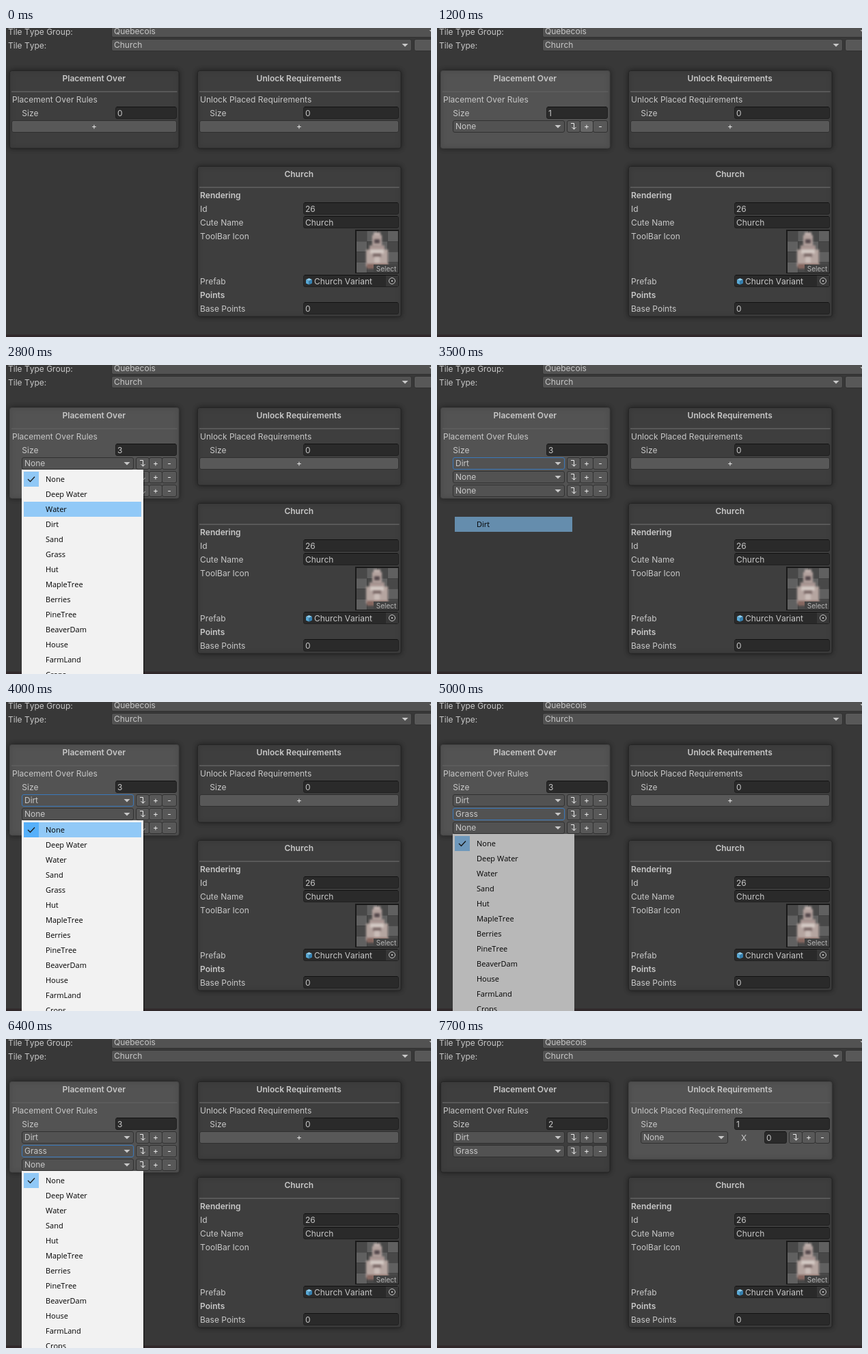
Recreate the animation shown at these times as an HTML page with a canvas. Size 622 by 452 pixels, loop 8 s.

```html
<!DOCTYPE html>
<html lang="en">
<head>
<meta charset="utf-8">
<title>Tile rule editor</title>
<style>
html, body { margin: 0; width: 100%; height: 100%; overflow: hidden; background: #383838; }
canvas { display: block; }
</style>
</head>
<body>
<canvas id="stage" width="622" height="452"></canvas>
<script>
const ctx = document.getElementById('stage').getContext('2d');
const LOOP = 8000;
const TILES = ['None', 'Deep Water', 'Water', 'Dirt', 'Sand', 'Grass', 'Hut', 'MapleTree', 'Berries',
  'PineTree', 'BeaverDam', 'House', 'FarmLand', 'Crops'];

// Each step overrides part of the state from its time on.
// hot: [button, row], menu: row of the open list, item: tile under the pointer,
// light: brightness of the list, closing: only the chosen item is left.
const STEPS = [
  [0, { rules: [], needs: 0, bottom: 176.5, active: '', hot: [], pressed: false, focus: -1, menu: -1, light: 1, item: '', closing: false }],
  [400, { hot: ['addRule'] }],
  [600, { rules: ['None'], active: 'rules', hot: [] }],
  [1100, { hot: ['move', 0] }],
  [1200, { hot: ['+', 0] }],
  [1400, { pressed: true }],
  [1500, { rules: ['None', 'None'], hot: [], pressed: false }],
  [1600, { hot: ['+', 0] }],
  [1700, { hot: [] }],
  [1900, { hot: ['-', 0] }],
  [2000, { hot: [] }],
  [2100, { hot: ['+', 0] }],
  [2300, { pressed: true }],
  [2400, { rules: ['None', 'None', 'None'], bottom: 195.5, hot: [], pressed: false }],
  [2600, { menu: 0, light: .76, item: 'None' }],
  [2700, { light: 1 }],
  [2800, { item: 'Water' }],
  [3200, { item: 'Dirt' }],
  [3500, { rules: ['Dirt', 'None', 'None'], focus: 0, closing: true, light: .7 }],
  [3600, { light: .5 }],
  [3700, { light: .3 }],
  [3800, { closing: false, menu: -1 }],
  [3900, { menu: 1, light: .76, item: 'None' }],
  [4000, { light: 1 }],
  [4100, { item: 'Water' }],
  [4200, { item: 'Grass' }],
  [4500, { rules: ['Dirt', 'Grass', 'None'], focus: 1, closing: true, light: .7 }],
  [4600, { light: .5 }],
  [4700, { light: .3 }],
  [4800, { closing: false, menu: -1 }],
  [5000, { menu: 2, light: .76, item: '' }],
  [5100, { light: 1 }],
  [5200, { item: 'Water' }],
  [5300, { item: 'MapleTree' }],
  [5400, { item: 'BeaverDam' }],
  [5500, { item: 'Crops' }],
  [5700, { item: '' }],
  [6200, { item: 'House' }],
  [6300, { item: 'Hut' }],
  [6400, { item: '' }],
  [6700, { menu: -1, focus: -1 }],
  [7000, { hot: ['-', 2] }],
  [7100, { rules: ['Dirt', 'Grass'], hot: [] }],
  [7400, { hot: ['addNeed'] }],
  [7600, { active: 'needs', pressed: true }],
  [7700, { needs: 1, hot: [], pressed: false }],
];

const stateAt = t => Object.assign({}, ...STEPS.filter(s => s[0] <= t).map(s => s[1]));

function rect(x, y, w, h, fill) {
  ctx.fillStyle = fill;
  ctx.fillRect(x, y, w, h);
}

function box(x, y, w, h, fill, border, radius = 2.5) {
  ctx.beginPath();
  ctx.roundRect(x + .5, y + .5, w - 1, h - 1, radius);
  ctx.fillStyle = fill;
  ctx.fill();
  ctx.lineWidth = 1;
  ctx.strokeStyle = border;
  ctx.stroke();
}

function text(s, x, y, { font = '12px Inter, sans-serif', color = '#c8c8c8', align = 'left' } = {}) {
  ctx.font = font;
  ctx.fontKerning = 'none';
  ctx.fillStyle = color;
  ctx.textAlign = align;
  ctx.fillText(s, x, y);
}

const heading = (s, x, y, align) => text(s, x, y, { font: '600 12px Inter, sans-serif', align });

function line(points, color, width = 1) {
  ctx.beginPath();
  points.forEach(([x, y]) => ctx.lineTo(x, y));
  ctx.strokeStyle = color;
  ctx.lineWidth = width;
  ctx.stroke();
}

function polygon(points, fill) {
  ctx.beginPath();
  points.forEach(([x, y]) => ctx.lineTo(x, y));
  ctx.fillStyle = fill;
  ctx.fill();
}

function field(x, y, w, value) {
  box(x, y, w, 18, '#2a2a2a', '#202020');
  rect(x + 2, y, w - 4, 1, '#121212');
  text(value, x + 3, y + 14);
}

function dropdown(x, y, w, value, focused) {
  box(x, y, w, 18, '#525252', focused ? '#3a79bb' : '#303030');
  text(value, x + 4, y + 13);
  const ax = x + w - 10;
  polygon([[ax - 4.5, y + 7], [ax + 4.5, y + 7], [ax, y + 11.5]], '#c8c8c8');
}

function button(x, y, w, label, s, name, row) {
  const hot = s.hot[0] === name && s.hot[1] === row;
  box(x, y, w, 18, hot ? (s.pressed ? '#46607c' : '#676767') : '#585858', '#303030');
  if (label) text(label, x + w / 2, y + 13, { align: 'center', color: '#eee' });
}

function rowButtons(x, y, s, row) {
  button(x, y, 20, '', s, 'move', row);
  line([[x + 6, y + 4.5], [x + 10.5, y + 4.5], [x + 10.5, y + 13]], '#eee');
  line([[x + 7.5, y + 10], [x + 10.5, y + 13.2], [x + 13.5, y + 10]], '#eee');
  button(x + 19, y, 20, '+', s, '+', row);
  button(x + 38, y, 22, '-', s, '-', row);
}

function panel(x, y, w, bottom, title, active) {
  ctx.save();
  ctx.shadowColor = 'rgba(0,0,0,.45)';
  ctx.shadowBlur = 7;
  box(x, y, w, bottom - y, active ? '#535353' : '#3e3e3e', active ? '#444' : '#252525', 3);
  ctx.restore();
  heading(title, x + w / 2 - .5, y + 16, 'center');
  rect(x + 3, y + 30.5, w - 6, 1.2, active ? '#626262' : '#6b6b6b');
}

function rulesPanel(s) {
  panel(5, 62, 248.5, s.bottom, 'Placement Over', s.active === 'rules');
  text('Placement Over Rules', 9, 109);
  text('Size', 23.3, 129);
  field(160, 115, 90, s.rules.length);
  if (!s.rules.length) button(8, 135, 242, '+', s, 'addRule');
  s.rules.forEach((rule, i) => {
    const y = 135 + i * 20;
    dropdown(23, y, 164, rule, s.focus === i);
    rowButtons(190, y, s, i);
  });
}

function needsPanel(s) {
  panel(280, 62, 298.5, 176.5, 'Unlock Requirements', s.active === 'needs');
  text('Unlock Placed Requirements', 284, 109);
  text('Size', 298.3, 129);
  field(435, 115, 140, s.needs);
  if (!s.needs) return button(283, 135, 292, '+', s, 'addNeed');
  dropdown(298, 135, 128, 'None');
  text('X', 445, 149);
  field(479, 135, 33, '0');
  rowButtons(515, 135, s, 9);
}

function thumbnail(x, y) {
  rect(x, y, 64, 64, '#191919');
  for (let i = 0; i < 16; i++) {
    const col = i % 4, row = i >> 2;
    rect(x + 2 + col * 15.2, y + 2 + row * 15.2, 15.2, 15.2, (col + row) % 2 ? '#606060' : '#484848');
  }
  ctx.save();
  ctx.filter = 'blur(1.4px)';
  rect(x + 27, y + 4, 10, 8, '#c0b2ae');
  rect(x + 25, y + 8, 14, 17, '#b3a29e');
  rect(x + 28, y + 14, 8, 6, '#55494c');
  rect(x + 21, y + 23, 22, 8, '#a99793');
  rect(x + 16, y + 29, 32, 25, '#b5a5a0');
  rect(x + 22, y + 29, 20, 6, '#d3c8c3');
  rect(x + 26, y + 35, 12, 5, '#7d6c6a');
  rect(x + 28, y + 40, 8, 9, '#cabdb8');
  rect(x + 17, y + 50, 31, 7, '#866760');
  ctx.restore();
  rect(x + 27, y + 51, 36, 12, '#424242');
  text('Select', x + 45.5, y + 61, { font: '10px Inter, sans-serif', align: 'center', color: '#b4b4b4' });
}

function tilePanel() {
  panel(280, 202, 298.5, 422.5, 'Church');
  heading('Rendering', 284, 249);
  text('Id', 284, 269);
  field(435, 255, 140, '26');
  text('Cute Name', 284, 289);
  field(435, 275, 140, 'Church');
  text('ToolBar Icon', 284, 309);
  thumbnail(511, 295);
  text('Prefab', 284, 375);
  field(435, 361, 140, '');
  rect(556, 362, 18, 16, '#373737');
  polygon([[439, 368], [443.5, 366], [448, 368], [443.5, 370]], '#8fcdec');
  polygon([[439, 368], [443.5, 370], [443.5, 375.5], [439, 373.5]], '#58a9d6');
  polygon([[448, 368], [443.5, 370], [443.5, 375.5], [448, 373.5]], '#3580b0');
  text('Church Variant', 451, 375);
  ctx.beginPath();
  ctx.arc(565, 370, 4.5, 0, 7);
  ctx.lineWidth = 1;
  ctx.strokeStyle = '#c4c4c4';
  ctx.stroke();
  rect(564, 369, 2, 2, '#c4c4c4');
  heading('Points', 284, 395);
  text('Base Points', 284, 415);
  field(435, 401, 140, '0');
}

function header() {
  text('Tile Type Group:', 3, 10);
  dropdown(154, -4, 480, '');
  text('Quebecois', 158, 9);
  text('Tile Type:', 3, 30);
  dropdown(154, 16, 440, 'Church');
  box(597, 16, 40, 18, '#585858', '#303030');
  rect(0, 448.5, 622, 4, '#30282a');
}

function menu(s) {
  if (s.menu < 0) return;
  const top = 153 + 20 * s.menu;
  const items = TILES.filter(tile => !s.rules.slice(0, s.menu).includes(tile));
  const label = { font: '11px "Open Sans", sans-serif', color: '#000' };
  const shade = `rgba(0,0,0,${1 - s.light})`;
  if (!s.closing) {
    if (s.light === 1) rect(201, top + 4, 2, 452, 'rgba(0,0,0,.3)');
    rect(23, top, 178, 452, '#f2f2f2');
  }
  items.forEach((tile, i) => {
    const y = top + 3 + i * 22, hovered = tile === s.item;
    if (s.closing && !hovered) return;
    if (hovered) rect(26, y, 172, 22, '#91c9f7');
    if (!i) {
      rect(26, y, 22, 22, hovered ? '#56b0fa' : '#90c8f6');
      line([[32, y + 11], [35.5, y + 14.5], [42, y + 7.5]], '#1a1a1a', 1.3);
    }
    text(tile, 58, y + 15, label);
    if (s.closing) rect(26, y, 172, 22, shade);
  });
  if (!s.closing) rect(23, top, 178, 452, shade);
}

function frame(now) {
  const s = stateAt(now % LOOP);
  rect(0, 0, 622, 452, '#383838');
  header();
  rulesPanel(s);
  needsPanel(s);
  tilePanel();
  menu(s);
  requestAnimationFrame(frame);
}
requestAnimationFrame(frame);
</script>
</body>
</html>
```
